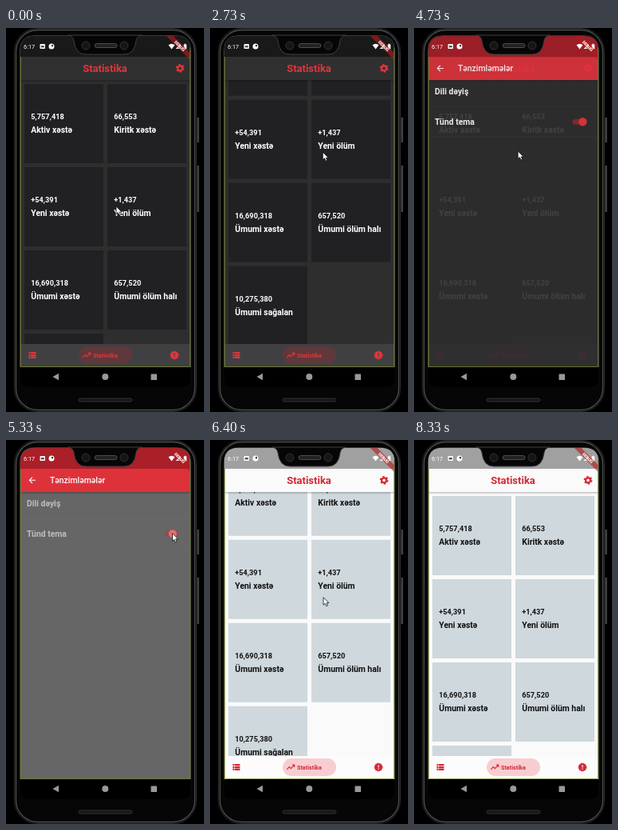
Write an HTML page that moves like this. It is 248x480 px and loops after 8400 ms.

```html
<!DOCTYPE html>
<html lang="az">
<head>
<meta charset="utf-8">
<title>Statistika</title>
<style>
html, body { margin: 0; width: 248px; height: 480px; overflow: hidden; background: #000; }
svg { display: block; font-family: Roboto, Arial, sans-serif; }
.bg { fill: var(--bg); }
.bar { fill: var(--bar); }
.status { fill: var(--status); }
.card { fill: var(--card); }
.ink { fill: var(--ink); }
.nav { fill: var(--nav); }
.pill { fill: var(--pill); }
.red { fill: var(--red); }
.line { fill: none; stroke: var(--red); }
.num { font: 700 9.2px Roboto, Arial, sans-serif; }
.label { font: 700 10.4px Roboto, Arial, sans-serif; }
</style>
</head>
<body>
<svg width="248" height="480" viewBox="0 0 248 480">
  <defs>
    <clipPath id="screen"><path d="M18 424V28Q18 10 36 10H213Q231 10 231 28V424Z"/></clipPath>
    <clipPath id="view"><rect x="18" y="65" width="213" height="330"/></clipPath>
    <linearGradient id="shade" x2="0" y2="1">
      <stop stop-opacity=".24"/><stop offset="1" stop-opacity="0"/>
    </linearGradient>
  </defs>

  <!-- phone body -->
  <path d="M239.5 112h2.2v31h-2.2zM239.5 172h2.2v58h-2.2z" fill="#4a4a4a"/>
  <rect x="10.5" y=".5" width="228" height="479" rx="29" fill="#060606" stroke="#2c2c2c"/>
  <rect x="12.5" y="2.5" width="224" height="475" rx="27" fill="none" stroke="#4c4c4c" stroke-width="1.4"/>
  <path d="M17.5 424V28Q17.5 9.5 36 9.5H213Q231.5 9.5 231.5 28V424" fill="none" stroke="#3a3a3a"/>
  <path d="M18 420H231V438Q231 449 220 449H29Q18 449 18 438Z"/>

  <g clip-path="url(#screen)">
    <g id="home">
      <rect class="bg" x="18" y="10" width="213" height="414"/>
      <g clip-path="url(#view)"><g id="cards"></g></g>
      <rect class="status" x="18" y="10" width="213" height="26"/>
      <rect class="bar" x="18" y="36" width="213" height="29"/>
      <rect x="18" y="65" width="213" height="3" fill="url(#shade)"/>
      <text class="red" x="124" y="54.6" text-anchor="middle" font-size="13" font-weight="700">Statistika</text>
      <g transform="translate(218 50.3)">
        <circle class="line" r="3" stroke-width="2.3"/>
        <circle class="line" r="4.6" stroke-width="1.6" stroke-dasharray="2.4 2.417"/>
      </g>
      <rect class="nav" x="18" y="395" width="213" height="29"/>
      <rect class="pill" x="91" y="398" width="67" height="22" rx="11"/>
      <path class="line" d="M96.3 411.8l3-3.2 2.2 2.1 4-4.5M102.8 406h2.9v2.9" stroke-width="1.15"/>
      <text class="red" x="109" y="411.6" font-size="7.2" font-weight="700">Statistika</text>
      <path class="red" d="M28.5 405h2v2.3h-2zm0 2.9h2v2.3h-2zm0 2.9h2v2.3h-2zM31.1 405h6.4v2.3h-6.4zm0 2.9h6.4v2.3h-6.4zm0 2.9h6.4v2.3h-6.4z"/>
      <g transform="translate(211 409)">
        <circle class="red" r="4.7"/>
        <circle class="line" r="4.8" stroke-width="1.2" stroke-dasharray="1.7 .813"/>
        <path class="nav" d="M-.6-2.8h1.2v3.4h-1.2zM-.6 1.6h1.2v1.2h-1.2z"/>
      </g>
    </g>

    <g id="settings">
      <rect class="bg" x="18" y="10" width="213" height="540"/>
      <rect x="18" y="10" width="213" height="26" fill="#aa1f28"/>
      <rect x="18" y="36" width="213" height="29" fill="#de323b"/>
      <rect x="18" y="65" width="213" height="3" fill="url(#shade)"/>
      <circle id="splash" cx="33" cy="50" r="14" fill="#fff" opacity="0"/>
      <path d="M37 50.3H29.5M33 46.6l-3.7 3.7 3.7 3.7" fill="none" stroke="#fff" stroke-width="1.1"/>
      <text x="55" y="54" font-size="10.4" font-weight="500" fill="#fff">Tənzimləmələr</text>
      <text class="ink label" x="26" y="83">Dili dəyiş</text>
      <text class="ink label" x="26" y="120.7">Tünd tema</text>
      <path class="ink" d="M18 98h213v.5H18zM18 135h213v.5H18z" opacity=".05"/>
      <rect id="track" x="198.5" y="113.6" width="17.5" height="7" rx="3.5"/>
      <circle id="thumb" cy="117.1" r="5.2"/>
    </g>
  </g>

  <!-- system icons -->
  <g fill="#fff">
    <text x="22" y="25.8" font-size="7.4">6:17</text>
    <rect x="42.5" y="20" width="6.5" height="6" rx="1"/>
    <path d="M43.8 22h4v2.4h-4z" fill="#555"/>
    <circle cx="57" cy="23" r="3.5"/>
    <path d="M57 21v2.2h2v-2.2z" fill="#333"/>
    <path d="M203.5 21.3Q207.5 18 211.5 21.3L207.5 26.5Z"/>
    <path d="M218.5 20v6h-6zM222.6 20.4h1v-.7h1.6v.7h1V26.5h-3.6z"/>
  </g>

  <g clip-path="url(#screen)">
    <g transform="translate(217.6 22.4) rotate(45)">
      <rect x="-25" y="-3.1" width="50" height="6.2" fill="#b71c1c" fill-opacity=".63"/>
      <text y="1.9" text-anchor="middle" font-size="5.2" font-weight="900" fill="#fff">DEBUG</text>
    </g>
    <path d="M18.5 36V423.5H230.5V24" fill="none" stroke="#75852b" stroke-opacity=".8"/>
  </g>

  <!-- notch, speakers, navigation keys -->
  <path d="M78 9Q84 10 85 16Q87 33 100 33H148Q161 33 163 16Q164 10 170 9Z" fill="#060606" stroke="#3f3f3f"/>
  <g fill="#161616" stroke="#303030">
    <circle cx="100" cy="22" r="5"/><circle cx="148" cy="22" r="5"/>
    <rect x="111" y="19.5" width="28" height="5" rx="2.5" fill="#222" stroke="#4c4c4c"/>
    <rect x="91" y="463" width="67" height="4" rx="2"/>
  </g>
  <g fill="#999">
    <path d="M58.5 436l7.5-4.2v8.4z"/><circle cx="124.3" cy="436" r="4"/><rect x="181.5" y="432.5" width="7.5" height="7.5" rx=".6"/>
  </g>

  <path id="cursor" d="M0 0V9.6L2.2 7.6 3.8 11 5.5 10.2 4 7H7Z" fill="#fff" stroke="#111" stroke-width=".8"/>
</svg>
<script>
const LOOP = 8400;
const $ = id => document.getElementById(id);

const stats = [
  ["5,757,418", "Aktiv xəstə"], ["66,553", "Kiritk xəstə"],
  ["+54,391", "Yeni xəstə"], ["+1,437", "Yeni ölüm"],
  ["16,690,318", "Ümumi xəstə"], ["657,520", "Ümumi ölüm halı"],
  ["10,275,380", "Ümumi sağalan"]
];
$("cards").innerHTML = stats.map(([num, label], i) => {
  const x = 23 + i % 2 * 104, y = 70 + (i >> 1) * 104;
  return `<rect class="card" x="${x}" y="${y}" width="99" height="99"/>
    <text class="ink num" x="${x + 8.3}" y="${y + 44.3}">${num}</text>
    <text class="ink label" x="${x + 8.3}" y="${y + 61}">${label}</text>`;
}).join("");

// [dark, light]
const theme = {
  bg: [0x2e2e2f, 0xfafafa], bar: [0x303031, 0xfafafa], status: [0x19191a, 0xa0a0a0],
  card: [0x212023, 0xcfd8dc], ink: [0xffffff, 0x111111], nav: [0x404042, 0xfcfcfc],
  pill: [0x5f383b, 0xf8cdd1], red: [0xe5343b, 0xd32832]
};

// [time, x, y]
const pointer = [
  [0, 138, 223], [860, 140, 226], [1500, 137, 281], [1750, 136, 262], [1930, 136, 242],
  [2000, 136, 225], [2400, 138, 150], [2700, 140, 150], [3300, 165, 250], [3660, 170, 243],
  [4300, 217, 50], [4430, 217, 50], [4730, 130, 154], [5200, 209, 117], [5330, 209, 117],
  [5700, 33, 52], [5790, 33, 52], [5860, 86, 178], [6100, 141, 258], [6200, 142, 255],
  [6400, 142, 197], [6550, 143, 150], [6900, 143, 150], [7500, 150, 250], [7780, 160, 300]
];
const scroll = [
  [0, 0], [1930, 0], [2000, 8], [2350, 80], [2550, 90], [2700, 90], [3200, 0],
  [6180, 0], [6400, 49], [6560, 90], [6950, 90], [7500, 0]
];

const ramp = (t, start, length) => Math.min(1, Math.max(0, (t - start) / length));
const lerp = (a, b, k) => a + (b - a) * k;

function at(keys, t) {
  const i = keys.findIndex(key => key[0] > t);
  if (i < 0) return keys[keys.length - 1].slice(1);
  const a = keys[i - 1], b = keys[i], k = ramp(t, a[0], b[0] - a[0]);
  return a.slice(1).map((v, j) => lerp(v, b[j + 1], k));
}

function mix([a, b], k) {
  return `rgb(${[16, 8, 0].map(s => Math.round(lerp(a >> s & 255, b >> s & 255, k)))})`;
}

function draw(t) {
  const light = ramp(t, 5290, 150);
  for (const name in theme) document.body.style.setProperty("--" + name, mix(theme[name], light));

  $("cards").setAttribute("transform", `translate(0 ${-at(scroll, t)[0]})`);

  // page fades in while rising, and reverses on leaving
  const open = ramp(t, 4448, 300) - ramp(t, 5794, 300);
  $("settings").setAttribute("opacity", open ** 1.7);
  $("settings").setAttribute("transform", `translate(0 ${101 * (1 - open) ** 2.3})`);
  $("splash").setAttribute("opacity", .2 * ramp(t, 5720, 70));

  $("thumb").setAttribute("cx", lerp(211.3, 202, light));
  $("thumb").setAttribute("fill", mix([0xe5343b, 0xfafafa], light));
  $("thumb").setAttribute("stroke", `rgba(0,0,0,${.15 * light})`);
  $("track").setAttribute("fill", mix([0x86282e, 0xa8a8a8], light));

  const [x, y] = at(pointer, t);
  $("cursor").setAttribute("transform", `translate(${x} ${y})`);
  $("cursor").setAttribute("visibility", t < 7780 ? "visible" : "hidden");
}

const start = performance.now();
function tick() {
  draw((performance.now() - start) % LOOP);
  requestAnimationFrame(tick);
}
tick();
</script>
</body>
</html>
```
